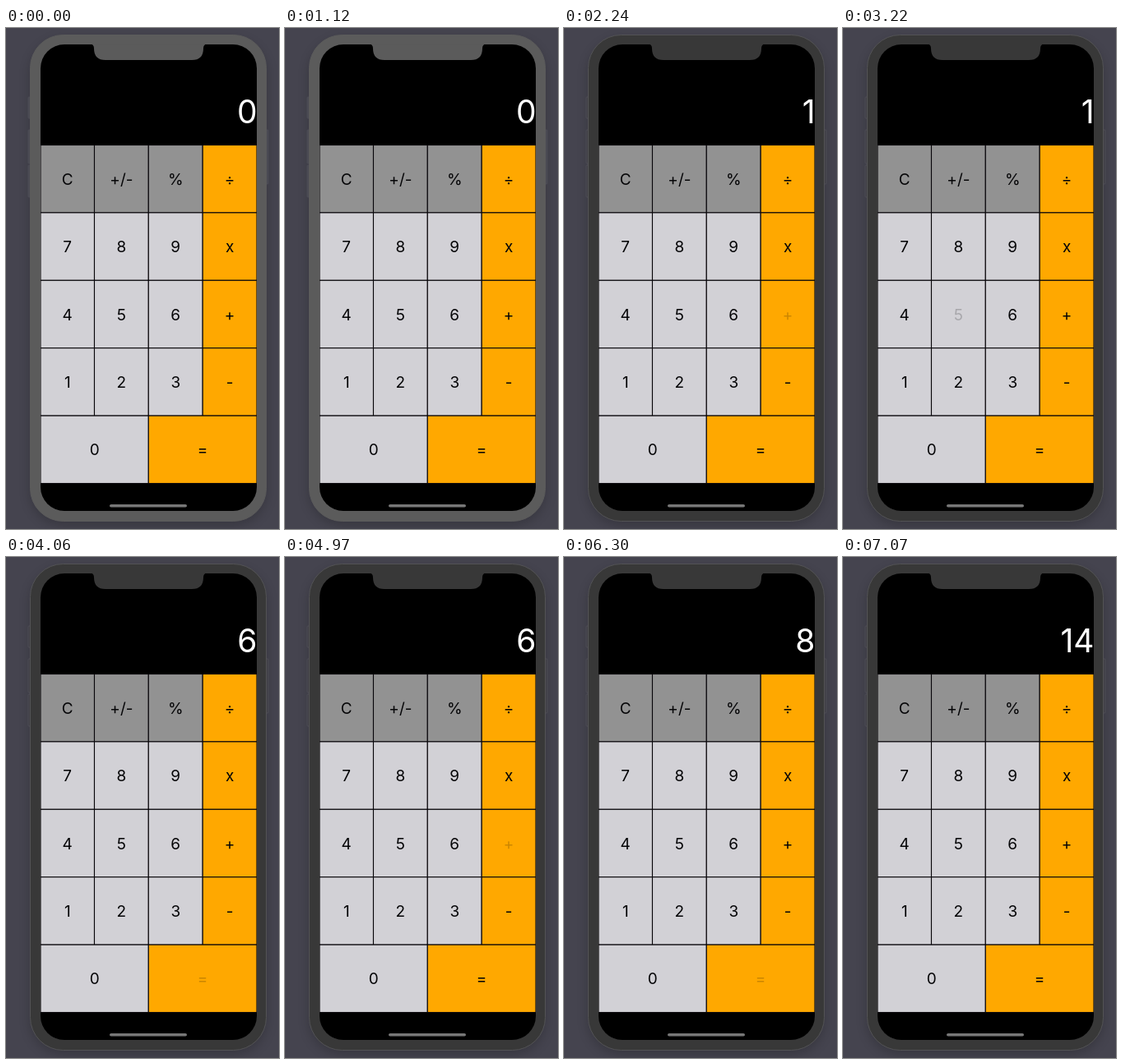
An HTML page that plays this animation: 332 by 610 pixels, repeating every 8000 ms.

```html
<!DOCTYPE html>
<html lang="en">
<head>
<meta charset="utf-8">
<title>Calculator</title>
<style>
html, body { margin: 0; width: 100%; height: 100%; overflow: hidden; background: #45444f; }
svg { display: block; width: 332px; height: 610px; font-family: Inter, Roboto, sans-serif; }
#keys text { font-size: 19px; text-anchor: middle; fill: #050507; }
#display { font-size: 39px; text-anchor: end; fill: #fff; }
</style>
</head>
<body>
<svg viewBox="0 0 332 610">
  <defs>
    <clipPath id="screen"><rect x="42" y="20" width="263" height="568" rx="29"/></clipPath>
    <filter id="blur" x="-20%" y="-20%" width="140%" height="140%"><feGaussianBlur stdDeviation="7"/></filter>
  </defs>
  <rect width="332" height="610" fill="#45444f"/>
  <rect x="29" y="14" width="288" height="592" rx="42" fill="#000" opacity=".2" filter="url(#blur)"/>
  <g id="sides" stroke-width=".8">
    <rect x="27" y="84" width="5" height="26" rx="1"/>
    <rect x="27" y="124" width="5" height="41" rx="1"/>
    <rect x="27" y="167" width="5" height="39" rx="1"/>
    <rect x="314" y="124" width="5" height="66" rx="1"/>
  </g>
  <rect id="body" x="29.5" y="8.5" width="287" height="592" rx="40"/>
  <g clip-path="url(#screen)">
    <rect x="42" y="20" width="263" height="568"/>
    <text id="display" x="305.5" y="115.5"></text>
    <g id="keys"></g>
    <rect x="126" y="580" width="94" height="3.6" rx="1.8" fill="#777"/>
  </g>
  <path id="notch" d="M103 19.5Q107 20 107 25Q107 39 121 39H226Q240 39 240 25Q240 20 244 19.5Z"/>
</svg>
<script>
const $ = id => document.getElementById(id);
const cols = [42, 107.5, 173.3, 239.2, 305];
const top0 = 142.5, rowH = 82.4;
const rows = [['C', '+/-', '%', '÷'], ['7', '8', '9', 'x'], ['4', '5', '6', '+'], ['1', '2', '3', '-'], ['0', '', '=', '']];
const labels = {};

function add(tag, attrs, text = '') {
  const el = document.createElementNS('http://www.w3.org/2000/svg', tag);
  for (const k in attrs) el.setAttribute(k, attrs[k]);
  el.textContent = text;
  return $('keys').appendChild(el);
}

rows.forEach((row, r) => row.forEach((label, c) => {
  if (!label) return;
  const x = cols[c], w = cols[c + (r === 4 ? 2 : 1)] - x, y = top0 + r * rowH;
  const fill = c === 3 || label === '=' ? '#ffa800' : r ? '#d2d1d6' : '#929292';
  add('rect', { x, y, width: w, height: rowH, fill, stroke: '#08060a', 'stroke-width': 1.1 });
  labels[label] = add('text', { x: x + w / 2, y: y + rowH / 2 + 7 }, label);
}));

// key, touch down (ms), touch up (ms), value shown after release
const taps = [
  ['1', 1160, 1240, '1'],
  ['+', 2150, 2450, '1'],
  ['5', 3140, 3440, '5'],
  ['=', 3980, 4045, '6'],
  ['+', 4820, 5050, '6'],
  ['8', 5590, 5680, '8'],
  ['=', 6290, 6320, '14']
];
const fade = 460, loop = 8000;
const ease = p => p * p * (3 - 2 * p);

function draw(t) {
  let value = '0';
  const alpha = {};
  for (const [key, down, up, result] of taps) {
    if (t >= up) value = result;
    if (t >= down && t < up + fade) alpha[key] = 0.2 + 0.8 * ease(Math.max(0, t - up) / fade);
  }
  for (const key in labels) labels[key].setAttribute('opacity', alpha[key] ?? 1);
  $('display').textContent = value;

  const active = t >= 1160;
  const shell = active ? '#383838' : '#5b5b5b';
  $('body').setAttribute('fill', shell);
  $('body').setAttribute('stroke', active ? '#535355' : '#5b5b5b');
  $('notch').setAttribute('fill', shell);
  $('sides').setAttribute('fill', active ? '#403f46' : '#4a4a52');
  $('sides').setAttribute('stroke', active ? '#51515a' : '#505058');
}

const start = performance.now();
function tick() {
  draw((performance.now() - start) % loop);
  requestAnimationFrame(tick);
}
tick();
</script>
</body>
</html>
```
